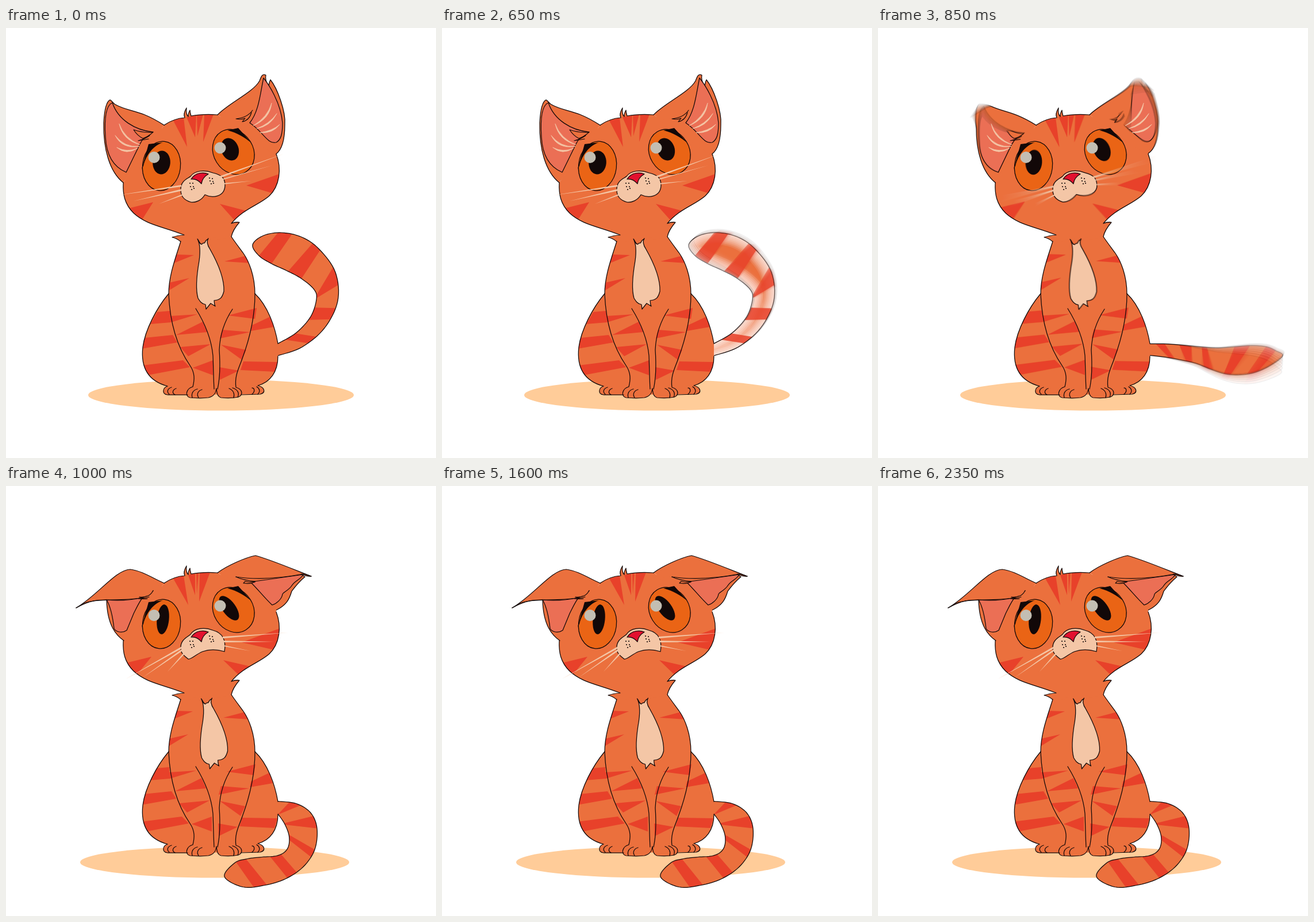
Recreate the animation shown at these times as an HTML page with a canvas. Size 748 by 748 pixels, loop 3000 ms.

```html
<!DOCTYPE html>
<html lang="en">
<head>
<meta charset="utf-8">
<title>Ginger cat</title>
<style>
  html, body { margin: 0; width: 100%; height: 100%; overflow: hidden; background: #fff; }
  canvas { display: block; width: 100vw; height: 100vh; }
</style>
</head>
<body>
<canvas id="stage" width="748" height="748"></canvas>
<script>
const SIZE = 748, LOOP = 3000, STEP = 50;
const FUR = '#eb703d', STRIPE = '#e8412a', CREAM = '#f4c6a6', PINK = '#eb6f55',
      IRIS = '#ea6415', INK = '#120808', GLINT = '#c3beb3', NOSE = '#e3112f', SHADE = '#ffcc99';

const view = document.getElementById('stage').getContext('2d');
const layer = document.createElement('canvas');
layer.width = layer.height = SIZE;
const g = layer.getContext('2d');

const lerp = (a, b, k) => a + (b - a) * k;
const clamp = x => Math.max(0, Math.min(1, x));
const smooth = x => { x = clamp(x); return x * x * (3 - 2 * x); };
const smoother = x => { x = clamp(x); return x ** 3 * (x * (6 * x - 15) + 10); };

// Blends two path strings of equal structure, number by number.
function mix(a, b, k) {
  const to = b.match(/[\d.]+/g);
  let i = 0;
  return a.replace(/[\d.]+/g, n => lerp(+n, +to[i++], k));
}

function paint(d, fill, line, width = 1.25) {
  const p = d instanceof Path2D ? d : new Path2D(d);
  if (fill) { g.fillStyle = fill; g.fill(p); }
  if (line) { g.strokeStyle = line; g.lineWidth = width; g.stroke(p); }
}
const poly = (pts, fill) => paint('M' + pts + 'Z', fill);

function within(d, draw) {
  g.save();
  g.clip(d instanceof Path2D ? d : new Path2D(d));
  draw();
  g.restore();
}

function oval(x, y, rx, ry, deg, fill, line) {
  const p = new Path2D();
  p.ellipse(x, y, rx, ry, deg * Math.PI / 180, 0, 7);
  paint(p, fill, line);
  return p;
}

// ---- tail: a chain of stations with a right and a left edge, root to tip ----
const pairs = s => s.match(/\d+ \d+/g).map(p => p.split(' ').map(Number));

function chain(right, left) {
  const r = pairs(right), l = pairs(left);
  const mid = r.map((p, i) => [(p[0] + l[i][0]) / 2, (p[1] + l[i][1]) / 2]);
  const turn = a => Math.atan2(Math.sin(a), Math.cos(a));
  let dir = 0;
  return mid.map((m, i) => {
    const next = mid[i + 1];
    if (next) dir += turn(Math.atan2(next[1] - m[1], next[0] - m[0]) - dir);
    const dx = (l[i][0] - r[i][0]) / 2, dy = (l[i][1] - r[i][1]) / 2;
    return {
      dir,
      len: next ? Math.hypot(next[0] - m[0], next[1] - m[1]) : 0,
      half: Math.hypot(dx, dy),
      lean: turn(Math.atan2(dy, dx) - dir)
    };
  });
}

const TAIL_UP = chain(
  '473 570 515 555 554 522 577 475 573 425 545 385 515 364 480 356 448 361 429 377',
  '473 549 505 530 530 502 540 472 536 455 514 436 488 422 462 410 440 396 429 377');
const TAIL_OUT = chain(
  '473 570 500 573 527 578 553 584 578 594 603 602 628 604 655 600 682 588 704 571',
  '473 550 500 550 530 552 560 555 590 557 620 555 650 553 675 555 692 562 704 571');
const TAIL_DOWN = chain(
  '473 570 484 586 492 606 492 624 485 636 470 643 445 645 420 648 398 655 380 679',
  '473 548 505 552 530 568 541 595 537 632 517 662 486 683 450 694 412 697 380 679');

// Bands: right edge from/to, left edge from/to, in stations.
const BANDS_UP = [[1.25, 1.6, .45, .95], [2.35, 2.75, 1.8, 2.5], [3.55, 4.2, 3.1, 3.4],
                  [4.95, 5.4, 5, 5.9], [6.5, 7.2, 7, 8]];
const BANDS_DOWN = [[.05, .1, .65, 1.25], [1, 1.15, 2.25, 3], [2, 2.5, 4, 4.4],
                    [4.5, 5.45, 5.4, 5.9], [7.1, 7.9, 6.9, 7.5]];

function outline(a, b, k, stretch) {
  let x = 473, y = 559.5;
  const r = [], l = [];
  a.forEach((s, i) => {
    const e = b[i], dir = lerp(s.dir, e.dir, k), half = lerp(s.half, e.half, k);
    const lean = dir + (i < 9 ? lerp(s.lean, e.lean, k) : 0);
    const dx = Math.cos(lean) * half, dy = Math.sin(lean) * half;
    r.push([x - dx, y - dy]);
    if (i < 9) l.unshift([x + dx, y + dy]);
    const len = lerp(s.len, e.len, k) * stretch;
    x += Math.cos(dir) * len;
    y += Math.sin(dir) * len;
  });
  return r.concat(l);
}

// Catmull-Rom point at station u.
function along(pts, u) {
  const i = Math.min(Math.floor(u), pts.length - 2), f = u - i;
  const at = n => pts[Math.max(0, Math.min(pts.length - 1, n))];
  const [p, q, r, s] = [at(i - 1), at(i), at(i + 1), at(i + 2)];
  return [0, 1].map(c => q[c] + .5 * f * (r[c] - p[c] +
    f * (2 * p[c] - 5 * q[c] + 4 * r[c] - s[c] + f * (3 * (q[c] - r[c]) + s[c] - p[c]))));
}

function drawTail(t, haze) {
  const swing = smoother((t - 640) / 210), drop = smooth((t - 850) / 150);
  const pts = drop > 0 ? outline(TAIL_OUT, TAIL_DOWN, drop, 1)
    : outline(TAIL_UP, TAIL_OUT, swing, 1 + .18 * Math.sin(Math.PI * swing));
  const edge = [];
  for (let u = 0; u <= 18; u += .125) edge.push(along(pts, u));
  const shape = new Path2D('M' + edge.join('L'));
  paint(shape, FUR);
  within(shape, () => {
    // Pale rim while the tail sets off.
    if (haze) for (let w = 6; w <= 42; w += 6) paint(shape, null, `rgba(255,255,255,${haze * .18})`, w);
    g.globalAlpha = 1 - haze * .15;
    BANDS_UP.forEach((band, i) => {
      const [a, b, c, d] = band.map((u, j) => lerp(u, BANDS_DOWN[i][j], drop));
      const spots = [a, (a + b) / 2, b, 18 - d, 18 - (c + d) / 2, 18 - c];
      poly(spots.map(u => along(pts, u)).join('L'), STRIPE);
    });
  });
  paint(shape, null, INK);
}

// ---- body ----
const HAUNCH = 'M283 462C262 487 242 525 238 555C234 590 247 614 281 623C272 626 271 637 281 638' +
  'L442 637C452 635 451 625 438 622C460 616 473 598 473 571L473 549C468 520 456 484 433 462';
const TORSO = 'M304 371C295 400 283 430 283 463C285 510 296 552 320 587C329 600 328 612 325 624' +
  'C314 627 310 640 320 643C332 644 344 644 352 643C362 641 365 635 366 627C367 636 368 641 374 643' +
  'C386 644 394 644 404 642C412 639 413 629 400 625C397 605 406 590 411 575C424 540 433 500 433 463' +
  'C433 430 422 405 413 392C405 381 398 372 392 363';
const BODY_BANDS = ['263 494 286 492 286 501 333 498 287 512 251 515', '342 511 350 529 296 534',
  '241 539 290 534 298 547 236 558', '303 555 356 550 317 571', '237 587 308 578 320 590 246 604',
  '325 591 360 578 360 604', '386 500 436 487 433 506', '376 525 425 529 372 540',
  '374 551 418 560 410 577', '371 590 405 596 372 612', '460 502 466 520 426 527 428 517',
  '413 580 474 581 469 598 408 595', '297 394 327 395 292 409', '284 443 319 435 281 458',
  '380 406 418 396 426 409'];
const BIB = 'M333 367C337 372 337 377 341 376C343 372 345 377 347 371C349 367 351 369 352 366' +
  'C348 372 351 379 355 385C368 408 380 435 379 458C376 470 372 473 362 474C363 479 362 481 364 484' +
  'L356 479L348 489L347 481C340 480 337 475 334 470C329 453 332 428 336 405C338 390 338 376 333 367Z';

function drawBody(k) {
  paint(HAUNCH, FUR);
  paint(TORSO, FUR);
  paint('M307 371L390 364', null, FUR, 4);
  const both = new Path2D(HAUNCH);
  both.addPath(new Path2D(TORSO));
  within(both, () => {
    g.translate(-2 * k, -3 * k);
    BODY_BANDS.forEach(b => poly(b, STRIPE));
  });
  // Outline of the haunches, left open where the tail joins.
  paint('M283 462C262 487 242 525 238 555C234 590 247 614 281 623C272 626 271 637 281 638L316 638' +
    'M410 638L442 637C452 635 451 625 438 622C460 616 473 598 473 571M473 549C468 520 456 484 433 462', null, INK);
  paint(TORSO, null, INK);
  paint('M330 488C345 512 357 538 360 570C361 595 361 612 362 628M394 489C380 510 372 535 371 560' +
    'C373 590 372 610 368 628M294 638C288 635 290 629 296 627M284 637C279 633 281 627 288 625' +
    'M428 637C434 632 432 626 428 626M438 637C443 632 441 627 436 624' +
    'M324 643C322 636 325 630 333 628M335 643C331 637 334 631 341 629' +
    'M388 627C396 630 398 637 396 643M394 626C404 629 406 636 403 642', null, INK);
  g.save();
  g.translate(6.5 * k, 3 * k);
  paint(BIB, CREAM, INK);
  g.restore();
}

// ---- head ----
const CROWN = '275 169C285 162 297 157 311 156C308 150 311 144 314 139C313 146 314 151 317 154' +
  'C317 149 318 146 320 143C320 147 321 150 322 153C338 150 352 150 368 151';
const RIGHT_SIDE = '470 219C480 245 476 275 458 292C440 308 412 315 392 340Q399 337 406 338C400 345 394 353 392 363';
const LEFT_SIDE = '304 372Q298 366 289 364Q298 361 310 360C272 345 245 343 222 322C206 306 203 289 204 269';
const SKULL = `M${CROWN}L${RIGHT_SIDE}L${LEFT_SIDE}Z`;
const HEAD_BANDS = [['291 161 309 156 315 207', '291 161 309 156 317 207'],
  ['314 155 331 152 329 190', '317 155 329 152 329 190'], ['332 150 343 150 333 188', '331 150 335 150 332 188'],
  ['345 150 361 150 343 198', '337 150 355 150 336 201'], ['256 303 212 314 237 333', '253 297 208 308 228 328'],
  ['478 253 418 274 466 288', '478 247 410 272 466 285'], ['372 306 418 318 397 334', '378 303 426 314 404 328']];
const EARS = [{
  shell: ['M204 269C180 250 169 210 170 165C171 145 174 128 181 125C185 127 186 131 190 133C215 147 230 140 275 169',
          'M205 269C192 260 176 243 175 198C160 198 148 198 122 212C160 190 190 146 216 145C235 147 255 160 275 169'],
  inner: ['M209 251C190 243 175 225 173 190C171 160 173 135 185 130C195 160 225 178 256 181C245 184 238 192 233 202Z',
          'M210 251C203 256 192 255 188 248C186 230 182 210 175 198C195 200 220 198 238 194C233 199 228 210 222 222Z'],
  tuft: ['M222 177Q240 183 256 181Q246 190 238 192Q228 187 222 177M250 187Q242 193 230 196Q242 194 248 193',
         'M256 182Q252 189 247 191Q240 194 232 193Q236 194 240 194M249 193Q240 196 230 196Q242 197 246 196'],
  fold: 'M256 182C252 188 245 192 237 194C210 201 165 194 136 204L122 212',
  seam: 'M268 175L206 262',
  hairs: ['M197 167Q206 192 233 203Q203 195 197 167', 'M190 187Q206 208 232 206Q202 211 190 187',
          'M193 208Q211 217 229 209Q209 222 193 208']
}, {
  shell: ['M368 151C388 130 430 112 441 92C444 84 446 79 452 82C450 92 455 98 457 104C457 98 458 94 460 90C472 105 487 145 485 168C485 190 482 210 470 219',
          'M368 151C385 138 418 124 434 121C460 128 500 145 531 157C524 158 518 155 514 153C517 157 519 157 520 158C508 168 503 175 497 183C493 197 488 207 470 216'],
  inner: ['M448 87C457 98 478 130 481 165C481 185 478 195 470 199C455 203 447 180 424 165C440 145 442 115 448 87Z',
          'M517 154C512 163 504 164 498 172C492 182 484 183 481 188C480 197 470 205 463 207C450 195 437 178 425 167C455 162 490 159 517 154Z'],
  tuft: ['M429 143Q420 156 400 158Q409 160 416 157L411 163Q423 161 427 147',
         'M400 158Q412 164 434 166Q426 168 416 166L413 169Q424 171 433 167'],
  fold: 'M400 158C440 164 480 160 517 153L531 157',
  seam: 'M376 156L467 217',
  hairs: ['M462 131Q459 158 430 170Q455 155 462 131', 'M471 149Q460 171 436 175Q458 167 471 149',
          'M476 168Q464 184 442 182Q463 179 476 168']
}];

function drawEar(ear, k) {
  const blend = name => mix(ear[name][0], ear[name][1], k);
  paint(blend('shell'), FUR, INK);
  paint(ear.seam, null, FUR, 6);
  paint(blend('inner'), PINK, INK);
  if (k < .5) ear.hairs.forEach(h => paint(h, CREAM, CREAM, .8));
  else paint(ear.fold, null, INK);
  paint(blend('tuft'), FUR, INK, 1.1);
}

const EYES = [
  { at: [270.5, 240, 33, 43, 7], lid: [270, 243, -9], glint: [257.5, 225],
    pupil: [[270.5, 234, 15.3, 20.5, 4], [273, 232, 10.5, 26, 6]],
    brow: 'M236 245L248 202L273 199C257 204 244 220 239 240Z' },
  { at: [395.7, 215.5, 34.5, 41, -32], lid: [395, 214, -25], glint: [372.5, 208.5],
    pupil: [[389.5, 211, 15, 20, -20], [388, 212.5, 11.5, 25, -36]],
    brow: 'M385 178L404 174L428 201C415 190 402 182 385 178Z' }
];

function drawEye(eye, k, gap) {
  const ball = oval(...eye.at, IRIS);
  oval(...eye.pupil[0].map((v, i) => lerp(v, eye.pupil[1][i], k)), INK);
  oval(...eye.glint, 10, 10, 0, GLINT);
  if (gap !== null) within(ball, () => {
    const [x, y, deg] = eye.lid;
    g.translate(x, y);
    g.rotate(deg * Math.PI / 180);
    for (const side of [-1, 1]) {
      g.fillStyle = STRIPE;
      g.fillRect(-60, side < 0 ? -60 - gap : gap, 120, 60);
      paint(`M-60 ${side * gap}H60`, null, INK, 1);
    }
  });
  paint(ball, null, INK);
  paint(eye.brow, INK);
}

const WHISKERS = [['305 273 305 276 194 291', '306 279 307 282 208 336'], ['306 280 307 283 222 301', '307 283 308 286 238 333'],
  ['307 289 308 291 266 306', '310 289 312 291 281 323'], ['371 258 372 261 483 219', '377 262 377 265 491 255'],
  ['374 263 374 265 463 239', '379 269 379 272 467 271'], ['378 270 378 272 427 266', '379 277 379 279 425 287']];
const MUZZLE = [
  'M304 282C303 265 317 262 321 258C328 248 345 246 360 252C377 256 381 262 381 274C380 295 358 296 346 290C340 300 330 304 322 303C310 300 304 292 304 282Z',
  'M304 282C303 267 317 262 321 258C328 247 345 245 360 251C379 256 383 270 380 288C367 284 353 284 342 288C330 293 322 302 317 301C311 296 304 292 304 282Z'];
const DOTS = pairs('320 270 325 270 321 276 326 276 323 281 327 279 354 261 359 262 355 266 360 267 357 271 361 270');

function drawHead(k, gap) {
  paint(SKULL, FUR);
  within(SKULL, () => HEAD_BANDS.forEach(([a, b]) => poly(mix(a, b, k), STRIPE)));
  EARS.forEach(e => drawEar(e, k));
  paint(`M${CROWN}M${RIGHT_SIDE}M${LEFT_SIDE}`, null, INK);
  EYES.forEach(e => drawEye(e, k, gap));
  paint(mix(MUZZLE[0], MUZZLE[1], k), CREAM, INK);
  paint('M322 263C330 250 345 251 352 254C345 258 341 263 340 271C335 265 328 262 322 263Z', NOSE, INK);
  DOTS.forEach(([x, y]) => oval(x, y, 1.1, 1.1, 0, INK));
  WHISKERS.forEach(([a, b]) => poly(mix(a, b, k), CREAM));
}

// ---- timing ----
function lidGap(t) {
  for (const start of [400, 1450, 2200])
    if (t >= start && t < start + 150) return [0, 13, 28][Math.floor((t - start) / STEP)];
  return null;
}

function drawScene(t, gap, haze) {
  const sad = smooth((t - 790) / 210), sink = smooth((t - 875) / 125);
  g.fillStyle = '#fff';
  g.fillRect(0, 0, SIZE, SIZE);
  g.lineJoin = g.lineCap = 'round';
  oval(lerp(374, 363, sink), lerp(638.5, 654.5, sink), lerp(231, 234, sink), 27, 0, SHADE);
  drawTail(t, haze);
  drawHead(sad, gap);
  drawBody(sad);
}

// Fast steps are averaged over an open shutter.
function render(t) {
  const shots = t >= 650 && t <= 950 ? 16 : 1;
  const haze = t >= 650 ? clamp((750 - t) / 100) : 0;
  for (let i = 0; i < shots; i++) {
    drawScene(t + (shots > 1 ? ((i + .5) / shots - .5) * STEP : 0), lidGap(t), haze);
    view.globalAlpha = 1 / (i + 1);
    view.drawImage(layer, 0, 0);
  }
  view.globalAlpha = 1;
}

let shown = -1;
const origin = performance.now();
function tick() {
  const t = Math.floor((performance.now() - origin) % LOOP / STEP) * STEP;
  if (t !== shown) render(shown = t);
  requestAnimationFrame(tick);
}
tick();
</script>
</body>
</html>
```
